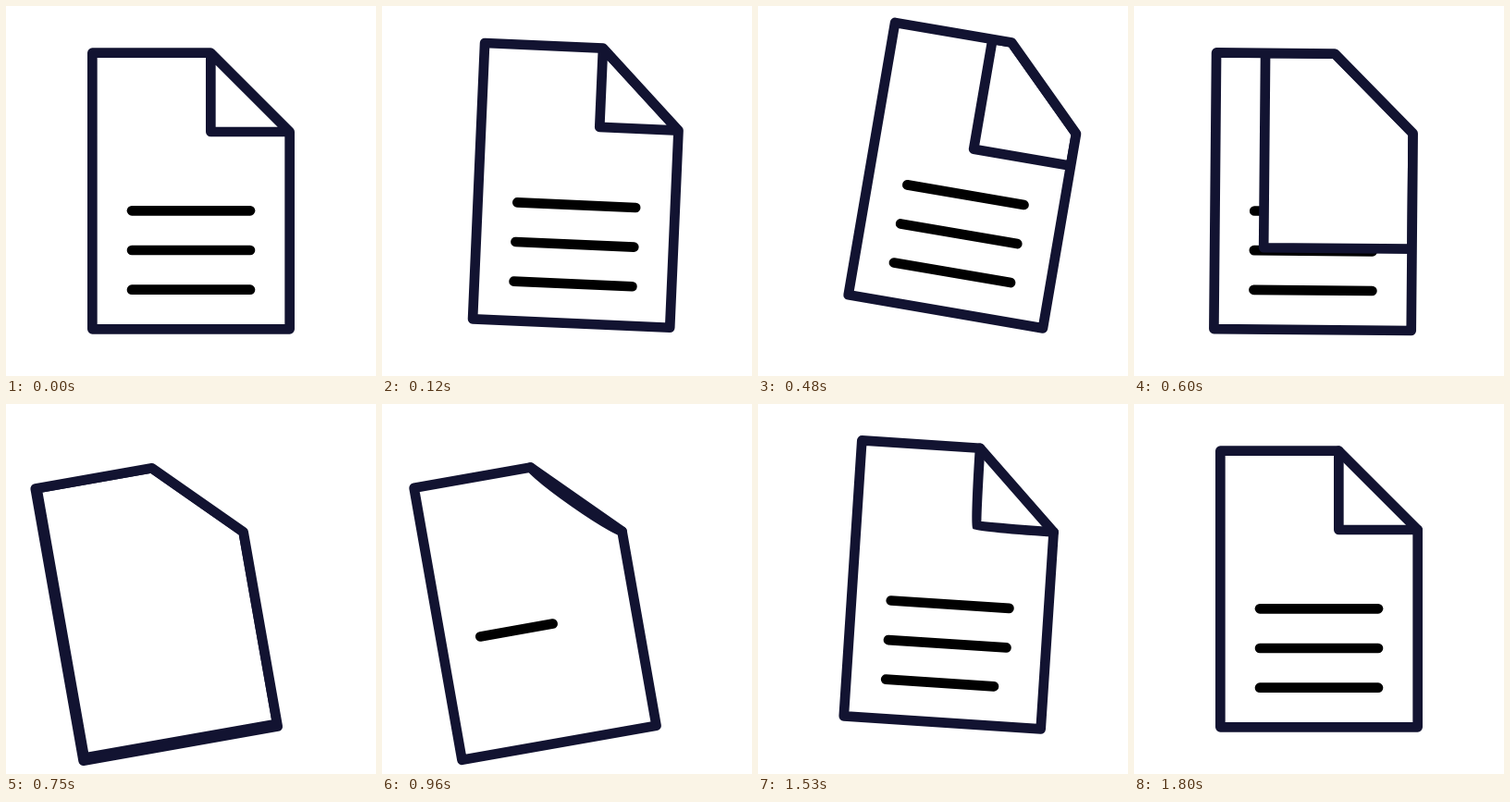
An HTML page with a canvas that plays this animation: 400 by 400 pixels, repeating every 3860 ms.

```html
<!DOCTYPE html>
<html lang="en">
<head>
<meta charset="utf-8">
<title>Page turn</title>
<style>
  html, body { margin: 0; width: 100%; height: 100%; overflow: hidden; background: #fff; }
  canvas { display: block; width: 100%; height: 100%; }
</style>
</head>
<body>
<canvas id="stage" width="400" height="400"></canvas>
<script>
const ctx = document.getElementById('stage').getContext('2d');
const LOOP = 3860, MOVE_END = 1800, STEP = 30;
const U = 128 / 3; // icon grid unit
const INK = '#121331';

// Page box and the two ends of the cut corner
const L = 200 - 2.5 * U, R = 200 + 2.5 * U;
const T = 200 - 3.5 * U, B = 200 + 3.5 * U;
const CX = R - 2 * U, CY = T + 2 * U;

// [time, value] keys, eased between neighbours
const MOVE_X = [[0, 0], [345, 40], [384, 40], [772, -38], [880, -38], [1375, 13.5], [1775, 0]];
const MOVE_Y = [[0, 0], [345, -22], [394, -22], [794, 21.5], [880, 21.5], [1350, -7.5], [1775, 0]];
const TILT = [[40, 0], [285, 10], [460, 10], [750, -10], [985, -10], [1380, 5.3], [1800, 0]];
const TURN = [377, 777];
const FOLD_START = 940, FOLD_TIME = 900;
const LINE_START = 794, LINE_GAP = 200, LINE_TIME = 600;

const clamp = x => Math.min(1, Math.max(0, x));
const mix = (a, b, p) => a + (b - a) * p;
const easeInOut = x => x * x * (3 - 2 * x);
const easeOut = x => 1 - (1 - x) ** 3;

function track(keys, t) {
  if (t <= keys[0][0]) return keys[0][1];
  for (let i = 1; i < keys.length; i++) {
    const [t0, a] = keys[i - 1], [t1, b] = keys[i];
    if (t < t1) return mix(a, b, easeInOut((t - t0) / (t1 - t0)));
  }
  return keys[keys.length - 1][1];
}

function pagePath() {
  ctx.beginPath();
  ctx.moveTo(L, T);
  ctx.lineTo(CX, T);
  ctx.lineTo(R, CY);
  ctx.lineTo(R, B);
  ctx.lineTo(L, B);
  ctx.closePath();
}

function textLine(row, p) {
  if (p <= 0) return;
  const x = L + U, y = 200 + (row + 0.5) * U;
  ctx.strokeStyle = '#000';
  ctx.beginPath();
  ctx.moveTo(x, y);
  ctx.lineTo(x + 3 * U * p, y);
  ctx.stroke();
}

function paintFold() {
  ctx.fill();
  ctx.strokeStyle = INK;
  ctx.stroke();
}

// The corner flap sweeps over the page to its lower left corner
function turningFold(p) {
  const x = mix(CX, L, p), y = mix(CY, B, p);
  ctx.save();
  pagePath();
  ctx.clip();
  ctx.beginPath();
  ctx.moveTo(R, y);
  ctx.lineTo(x, y);
  ctx.lineTo(x, T);
  ctx.lineTo(CX, T);
  ctx.lineTo(R, CY);
  ctx.closePath();
  paintFold();
  ctx.restore();
}

// A new flap bulges out of the diagonal and sharpens into a corner
function growingFold(p) {
  const x = mix((CX + R) / 2, CX, p), y = mix((T + CY) / 2, CY, p);
  const h = (1 - p) * 36;
  ctx.beginPath();
  ctx.moveTo(CX, T);
  ctx.bezierCurveTo(CX, T, x - h, y - h, x, y);
  ctx.bezierCurveTo(x + h, y + h, R, CY, R, CY);
  paintFold();
}

function draw(t) {
  ctx.fillStyle = '#fff';
  ctx.fillRect(0, 0, 400, 400);
  ctx.lineWidth = U / 4;
  ctx.lineCap = ctx.lineJoin = 'round';

  ctx.save();
  ctx.translate(200 + track(MOVE_X, t), 200 + track(MOVE_Y, t));
  ctx.rotate(track(TILT, t) * Math.PI / 180);
  ctx.translate(-200, -200);

  if (t < TURN[1]) {
    for (let row = 0; row < 3; row++) textLine(row, 1);
    turningFold(easeInOut(clamp((t - TURN[0]) / (TURN[1] - TURN[0]))));
  } else {
    for (let row = 0; row < 3; row++) {
      const start = LINE_START + row * LINE_GAP;
      textLine(row, easeOut(clamp((t - start) / LINE_TIME)));
    }
    growingFold(easeOut(clamp((t - FOLD_START) / FOLD_TIME)));
  }

  pagePath();
  ctx.strokeStyle = INK;
  ctx.stroke();
  ctx.restore();
}

const begin = performance.now();
function tick() {
  const t = (performance.now() - begin) % LOOP;
  draw(Math.min(MOVE_END, Math.floor(t / STEP) * STEP));
  requestAnimationFrame(tick);
}
tick();
</script>
</body>
</html>
```
